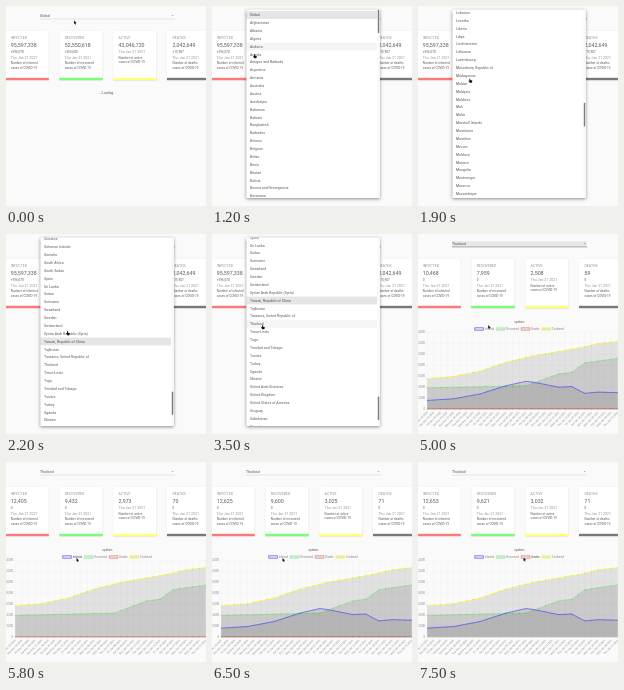
Recreate the animation shown at these times as an HTML page with a canvas. Size 200 by 200 pixels, loop 8000 ms.

```html
<!DOCTYPE html>
<html lang="en">
<head>
<meta charset="utf-8">
<title>Case dashboard</title>
<style>
html, body { margin: 0; width: 100%; height: 100%; overflow: hidden; background: #fafafa; }
canvas { display: block; width: 100vw; height: 100vh; }
</style>
</head>
<body>
<canvas id="stage"></canvas>
<script>
const canvas = document.getElementById('stage');
const ctx = canvas.getContext('2d');
const LOOP = 8000;
const TICK = 100;
const U = 0.2187; // one page pixel in stage units
const SANS = 'Roboto, sans-serif';
const CHART_FONT = '"Liberation Sans", Arial, sans-serif';
const INK = 'rgba(0,0,0,.66)', SOFT = 'rgba(0,0,0,.42)', LABEL = 'rgba(0,0,0,.48)';

const COUNTRIES = ('Global|Afghanistan|Albania|Algeria|Andorra|Angola|Antigua and Barbuda|Argentina|Armenia|Australia|' +
  'Austria|Azerbaijan|Bahamas|Bahrain|Bangladesh|Barbados|Belarus|Belgium|Belize|Benin|Bhutan|Bolivia|' +
  'Bosnia and Herzegovina|Botswana|Brazil|Brunei Darussalam|Bulgaria|Burkina Faso|Burundi|Cambodia|Cameroon|Canada|' +
  'Cape Verde|Central African Republic|Chad|Chile|China|Colombia|Comoros|Congo (Brazzaville)|Congo (Kinshasa)|' +
  'Costa Rica|Croatia|Cuba|Cyprus|Czech Republic|Côte d\'Ivoire|Denmark|Djibouti|Dominica|Dominican Republic|Ecuador|' +
  'Egypt|El Salvador|Equatorial Guinea|Eritrea|Estonia|Ethiopia|Fiji|Finland|France|Gabon|Gambia|Georgia|Germany|' +
  'Ghana|Greece|Grenada|Guatemala|Guinea|Guinea-Bissau|Guyana|Haiti|Holy See (Vatican City State)|Honduras|Hungary|' +
  'Iceland|India|Indonesia|Iran, Islamic Republic of|Iraq|Ireland|Israel|Italy|Jamaica|Japan|Jordan|Kazakhstan|Kenya|' +
  'Korea (South)|Kuwait|Kyrgyzstan|Lao PDR|Latvia|Lebanon|Lesotho|Liberia|Libya|Liechtenstein|Lithuania|Luxembourg|' +
  'Macedonia, Republic of|Madagascar|Malawi|Malaysia|Maldives|Mali|Malta|Marshall Islands|Mauritania|Mauritius|Mexico|' +
  'Moldova|Monaco|Mongolia|Montenegro|Morocco|Mozambique|Myanmar|Namibia|Nepal|Netherlands|New Zealand|Nicaragua|' +
  'Niger|Nigeria|Norway|Oman|Pakistan|Palestinian Territory|Panama|Papua New Guinea|Paraguay|Peru|Philippines|Poland|' +
  'Portugal|Qatar|Republic of Kosovo|Romania|Russian Federation|Rwanda|Saint Kitts and Nevis|Saint Lucia|' +
  'Saint Vincent and Grenadines|Samoa|San Marino|Sao Tome and Principe|Saudi Arabia|Senegal|Serbia|Seychelles|' +
  'Sierra Leone|Singapore|Slovakia|Slovenia|Solomon Islands|Somalia|South Africa|South Sudan|Spain|Sri Lanka|Sudan|' +
  'Suriname|Swaziland|Sweden|Switzerland|Syrian Arab Republic (Syria)|Taiwan, Republic of China|Tajikistan|' +
  'Tanzania, United Republic of|Thailand|Timor-Leste|Togo|Trinidad and Tobago|Tunisia|Turkey|Uganda|Ukraine|' +
  'United Arab Emirates|United Kingdom|United States of America|Uruguay|Uzbekistan|Vanuatu|Venezuela (Bolivarian Republic)|' +
  'Viet Nam|Yemen|Zambia|Zimbabwe').split('|');
const TAIWAN = COUNTRIES.findIndex(name => name.startsWith('Taiwan'));
const THAILAND = COUNTRIES.indexOf('Thailand');

const CARDS = [
  { kind: 'infected', world: 95597338, local: 12653, delta: '+596,070', color: '255,0,0' },
  { kind: 'recovered', world: 52550618, local: 9621, delta: '+265,600', color: '0,255,0' },
  { kind: 'active', world: 43046720, local: 3032, color: '255,255,0' },
  { kind: 'deaths', world: 2042649, local: 71, delta: '+15,907', color: '0,0,0' }
];

const clamp = v => Math.max(0, Math.min(1, v));
const linear = p => p;
const smooth = p => p * p * (3 - 2 * p);

// Interpolates keys of [position, value, value, ...]
function track(at, keys, ease = smooth) {
  let i = 0;
  while (i < keys.length - 2 && at >= keys[i + 1][0]) i++;
  const [a, b] = [keys[i], keys[i + 1]];
  const p = ease(clamp((at - a[0]) / (b[0] - a[0])));
  return a.slice(1).map((v, k) => v + (b[k + 1] - v) * p);
}

// Daily totals in hundreds of people, from a few turning points
const DAY_COUNT = 30;
const DAYS = Array.from({ length: DAY_COUNT }, (_, i) => new Date(2020, 11, 23 + i).toDateString());
const daily = keys => DAYS.map((_, i) => track(i, keys, linear)[0]);
const confirmed = daily([[0, 57], [4, 61], [8, 71], [12, 87.5], [16, 99.5], [23, 114], [26, 122.5], [29, 126.5]]);
const recovered = daily([[0, 40], [15, 43.8], [17, 52.5], [20, 66], [22, 69], [24, 86.5], [29, 95]]);
const deaths = daily([[0, 0.6], [29, 0.71]]);
const infected = confirmed.map((total, i) => total - recovered[i] - deaths[i]);

const SERIES = [
  { name: 'Infected', color: '#33f', data: infected, hidden: t => t >= 5800 && t < 6400 },
  { name: 'Recovered', color: 'rgba(0,255,0,.5)', data: recovered, hidden: () => false },
  { name: 'Deaths', color: 'rgba(255,0,0,.6)', data: deaths, hidden: t => t >= 7500 },
  { name: 'Confirmed', color: '#ff0', data: confirmed, hidden: () => false }
];

const CURSOR = [[0, 68, 14.5], [700, 67, 11.5], [1200, 42, 48], [1600, 42, 48], [2200, 61, 97], [2900, 56, 104],
  [3400, 50, 91], [4000, 50, 91], [4300, 69, 73], [5300, 70.5, 96], [6500, 70.5, 96], [7300, 105.5, 95.5]];

function text(str, x, y, px, color, { align = 'left', font = SANS, weight = 400, angle = 0 } = {}) {
  ctx.save();
  ctx.translate(x, y);
  ctx.rotate(angle);
  ctx.scale(U, U);
  ctx.font = `${weight} ${px}px ${font}`;
  ctx.letterSpacing = font === SANS ? '0.15px' : '0px';
  ctx.textAlign = align;
  ctx.textBaseline = 'alphabetic';
  ctx.fillStyle = color;
  ctx.fillText(str, 0, px * 0.35);
  ctx.restore();
}

function rect(x, y, w, h, color) {
  ctx.fillStyle = color;
  ctx.fillRect(x, y, w, h);
}

function line(x1, y1, x2, y2, color, width = U) {
  ctx.beginPath();
  ctx.moveTo(x1, y1);
  ctx.lineTo(x2, y2);
  ctx.strokeStyle = color;
  ctx.lineWidth = width;
  ctx.stroke();
}

function paper(x, y, w, h, blur, shade) {
  const scale = canvas.width / 200;
  ctx.save();
  ctx.shadowColor = `rgba(0,0,0,${shade})`;
  ctx.shadowBlur = blur * scale;
  ctx.shadowOffsetY = blur * 0.3 * scale;
  ctx.beginPath();
  ctx.roundRect(x, y, w, h, 4 * U);
  ctx.fillStyle = '#fff';
  ctx.fill();
  ctx.restore();
}

function drawSelect(t) {
  const focused = t >= 4000 && t < 5500;
  const hover = t < 4000 ? clamp((t - 50) / 200) : 0;
  if (focused) rect(34, 7.2, 135, 5.8, 'rgba(0,0,0,.07)');
  text(t < 4600 ? 'Global' : 'Thailand', 34, 9.5, 16, INK);
  line(34, 13, 169, 13, 'rgba(0,0,0,.42)');
  if (focused || hover) line(34, 12.9, 169, 12.9, `rgba(0,0,0,${focused ? 0.5 : 0.6 * hover})`, 2 * U);
  ctx.beginPath();
  ctx.moveTo(165.5, 9.2);
  ctx.lineTo(167.7, 9.2);
  ctx.lineTo(166.6, 10.3);
  ctx.fillStyle = SOFT;
  ctx.fill();
}

function counter(card, t) {
  if (t < 4600) return card.world;
  const p = clamp((t - 4343) / 2600);
  return Math.round(card.local * (p === 1 ? 1 : (1 - 2 ** (-10 * p)) * 1024 / 1023));
}

function drawCard(card, i, t) {
  const left = -0.7 + 53.9 * i, x = left + 5.5;
  paper(left, 24.3, 43.5, 50, 0.9, 0.2);
  rect(left, 71.8, 43.5, 2.3, `rgba(${card.color},.53)`);
  text(card.kind.toUpperCase(), x, 31.8, 16, SOFT);
  text(counter(card, t).toLocaleString('en-US'), x, 39.6, 24, INK);
  let y = 46;
  if (card.delta) {
    text(t < 4600 ? card.delta : '0', x, y, 14, INK);
    y += 5.6;
  }
  text('Thu Jan 21 2021', x, y, 16, SOFT);
  text('Number of ' + card.kind, x, y + 5.5, 14, INK);
  text('cases of COVID-19', x, y + 10.1, 14, INK);
}

function drawLegend(t) {
  ctx.font = '12px ' + CHART_FONT;
  const widths = SERIES.map(s => ctx.measureText(s.name).width);
  let x = 101.3 - (widths.reduce((a, b) => a + b) + 4 * 46 + 30) * U / 2;
  SERIES.forEach((s, i) => {
    rect(x, 93.7, 40 * U, 12 * U, 'rgba(0,0,0,.1)');
    ctx.strokeStyle = s.color;
    ctx.lineWidth = 2.4 * U;
    ctx.strokeRect(x, 93.7, 40 * U, 12 * U);
    const labelX = x + 46 * U;
    text(s.name, labelX, 95, 12, LABEL, { font: CHART_FONT });
    if (s.hidden(t)) line(labelX, 95, labelX + widths[i] * U, 95, '#666', 2 * U);
    x += (56 + widths[i]) * U;
  });
}

function drawChart(t) {
  const left = 9.2, right = 199.8, top = 98.2, base = 175.2;
  const grid = 'rgba(0,0,0,.1)';
  const xAt = i => left + (right - left) * i / (DAY_COUNT - 1);
  text('updates', 101.5, 87.8, 12, LABEL, { align: 'center', font: CHART_FONT, weight: 700 });
  drawLegend(t);
  for (let k = 0; k <= 7; k++) {
    const y = base - (base - top) * k / 7;
    line(left - 2, y, 200, y, grid);
    text((k * 2000).toLocaleString('en-US'), 7, y, 12, LABEL, { align: 'right', font: CHART_FONT });
  }
  DAYS.forEach((day, i) => {
    line(xAt(i), top, xAt(i), base + 2, grid);
    text(day, xAt(i), 178, 12, LABEL, { align: 'right', font: CHART_FONT, angle: -Math.PI / 4 });
  });
  const grow = 1 - (1 - clamp((t - 4400) / 1000)) ** 4;
  for (const s of [...SERIES].reverse()) {
    if (s.hidden(t)) continue;
    const yAt = i => base - (base - top) * s.data[i] / 140 * grow;
    const curve = new Path2D();
    s.data.forEach((_, i) => curve.lineTo(xAt(i), yAt(i)));
    const area = new Path2D(curve);
    area.lineTo(right, base);
    area.lineTo(left, base);
    ctx.fillStyle = grid;
    ctx.fill(area);
    ctx.strokeStyle = s.color;
    ctx.lineWidth = 2.6 * U;
    ctx.lineJoin = 'round';
    ctx.stroke(curve);
    s.data.forEach((_, i) => {
      ctx.beginPath();
      ctx.arc(xAt(i), yAt(i), 3 * U, 0, 7);
      ctx.fill();
    });
  }
}

function drawMenu(t) {
  const left = 34.4, top = 3.5, width = 133.4, height = 188.5, rowHeight = 36 * U;
  const taiwanAt = y => 9 + rowHeight * TAIWAN - y;
  const [scroll] = track(t, [[1500, 0], [2200, taiwanAt(107.5)], [2700, taiwanAt(107.5)], [2900, taiwanAt(66.5)]]);
  const open = clamp((t - 600) / 200);
  ctx.save();
  ctx.globalAlpha = open;
  ctx.translate(101, 9);
  ctx.scale(0.75 + 0.25 * open, 0.56 + 0.44 * open);
  ctx.translate(-101, -9);
  paper(left, top, width, height, 3.4, 0.45);
  ctx.beginPath();
  ctx.rect(left, top, width, height);
  ctx.clip();
  let hover = -1;
  if (t < 1600) hover = Math.floor((track(t - 100, CURSOR)[1] - 5.2) / rowHeight);
  else if (t >= 3300) hover = THAILAND;
  const focus = t >= 3700 ? THAILAND : t >= 1900 ? TAIWAN : 0;
  COUNTRIES.forEach((name, i) => {
    const y = 9 + rowHeight * i - scroll;
    if (y < -5 || y > 200) return;
    const shade = i === focus ? 0.1 : i === 0 ? 0.08 : i === hover ? 0.04 : 0;
    rect(left, y - rowHeight / 2, 130.8, rowHeight, `rgba(0,0,0,${shade})`);
    text(name, 38, y, 16, INK);
  });
  rect(165.2, top, 2.6, height, '#fafafa');
  const content = COUNTRIES.length * rowHeight + 16 * U;
  ctx.beginPath();
  ctx.roundRect(165.8, top + scroll / content * height, 1.5, height * height / content, 0.75);
  ctx.fillStyle = 'rgba(0,0,0,.5)';
  ctx.fill();
  ctx.restore();
}

function drawCursor(t) {
  const [x, y] = track(t, CURSOR);
  const hand = t >= 100 && t < 4000;
  const shape = new Path2D(hand
    ? 'M0 0h.7l.1 1.5 1.9.4v1.3l-.5 1.1h-1.9l-1.3-1.8.4-.4.6.5z'
    : 'M0 0v3.6l.8-.7.6 1.3.6-.3-.6-1.2 1.2-.1z');
  ctx.save();
  ctx.translate(x, y);
  ctx.lineJoin = 'round';
  ctx.strokeStyle = '#fff';
  ctx.lineWidth = 0.6;
  ctx.stroke(shape);
  ctx.fillStyle = '#111';
  ctx.fill(shape);
  ctx.restore();
}

function draw(now) {
  const t = Math.floor(now % LOOP / TICK) * TICK;
  const w = Math.round(innerWidth * devicePixelRatio), h = Math.round(innerHeight * devicePixelRatio);
  if (canvas.width !== w || canvas.height !== h) Object.assign(canvas, { width: w, height: h });
  ctx.setTransform(w / 200, 0, 0, h / 200, 0, 0);
  rect(0, 0, 200, 200, '#fafafa');
  drawSelect(t);
  CARDS.forEach((card, i) => drawCard(card, i, t));
  if (t < 4600) text('...Loading', 93, 87, 16, INK, { font: '"Liberation Serif", serif' });
  else drawChart(t);
  if (t >= 700 && t < 4000) drawMenu(t);
  drawCursor(t);
}

const start = performance.now();
function tick() {
  draw(performance.now() - start);
  requestAnimationFrame(tick);
}
tick();
</script>
</body>
</html>
```
